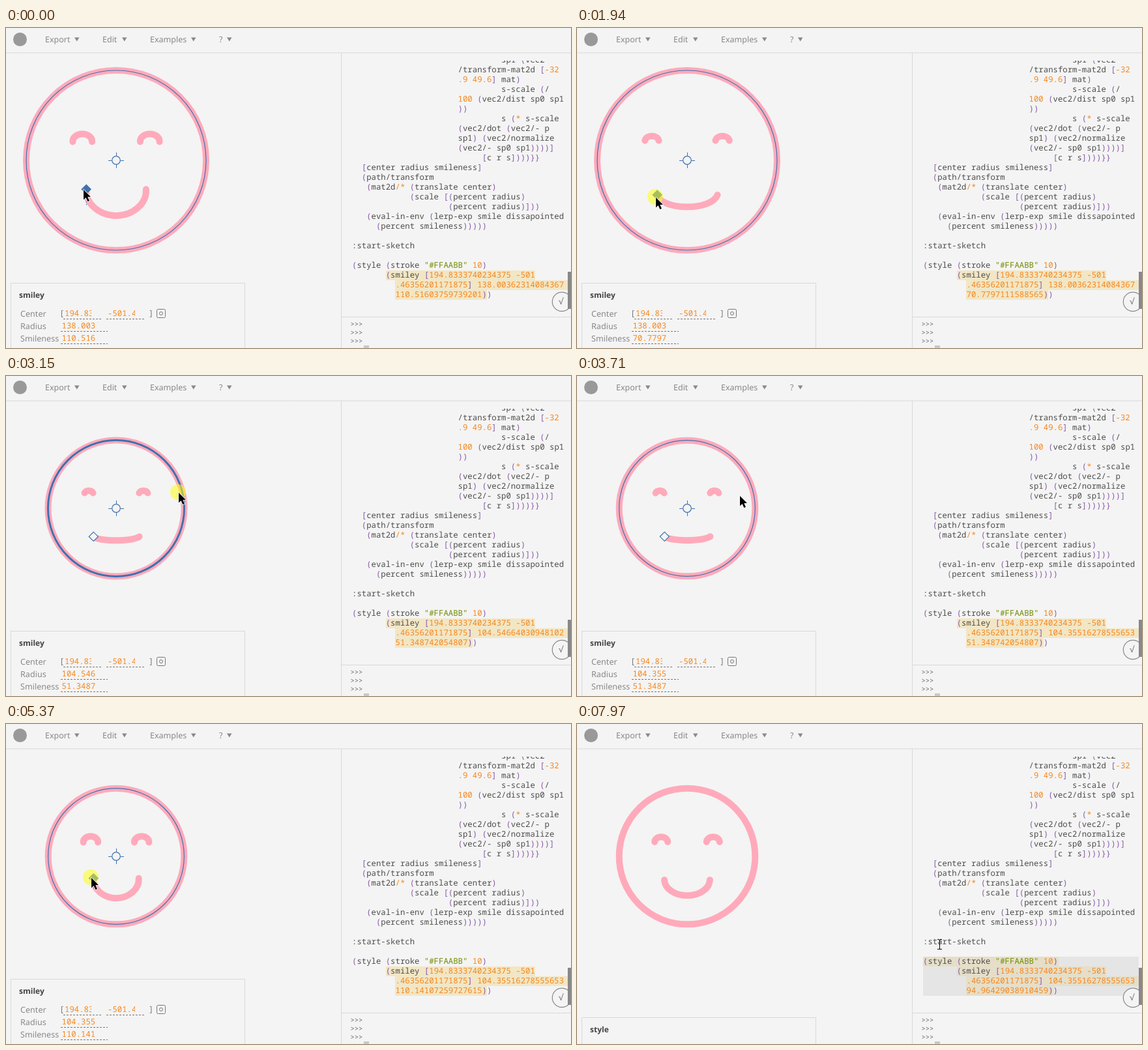
An HTML page with a canvas for the animation above (8 s loop, 867x491 px).

```html
<!DOCTYPE html>
<html lang="en">
<head>
<meta charset="utf-8">
<title>Smiley editor</title>
<style>
html, body { margin: 0; width: 100%; height: 100%; overflow: hidden; background: #f4f4f4; }
canvas { display: block; }
</style>
</head>
<body>
<canvas id="stage" width="867" height="491"></canvas>
<script>
const ctx = document.getElementById('stage').getContext('2d');
const LOOP = 8000, STEP = 92.4, LEAD = 85;
const BG = '#f4f4f4', PINK = '#ffaabb', BLUE = '#3f72b0', TAN = '#f2e6c4';
const GREY = '#888', LINE = '#d8d8d8', INK = '#4d4d4c';
const PURPLE = '#8959a8', ORANGE = '#f5871f', GREEN = '#718c00';
const CX = 169, CY = 203, COL = 7.39, CODE_X = 531;
const mono = size => size + 'px "Noto Sans Mono", "DejaVu Sans Mono", monospace';
const sans = (size, weight = '') => weight + ' ' + size + 'px "Noto Sans", "Open Sans", sans-serif';

// Keys: [step, value...]
const SMILE = [
  [0, 110.51603759739201], [5, 41.2], [9, 0.9137], [12, 32.08078443652971], [17, 112.3],
  [20, 70.7797111588565], [24, 44.1], [26, 51.348742054807], [51, 51.348742054807],
  [55, 115.2], [56, 115.2], [60, 94.96429038910459]
];
const RADIUS = [[30, 138.00362314084367], [33, 104.54664030948102], [36, 104.35516278555653]];
const POINTER = [
  [0, 118.5, 248], [9, 120, 269], [12, 120, 263], [17, 120, 248], [20, 121, 260], [26, 121, 262],
  [29, 299, 166], [30, 299, 166], [33, 265, 179], [36, 264, 180], [44, 226, 190], [45, 222, 192],
  [49, 131, 243], [51, 131, 243], [55, 131, 235], [56, 131, 235], [60, 131, 240], [61, 131, 240],
  [66, 664, 366], [69, 664, 366], [73, 534, 366], [76, 534, 366], [79, 494, 365], [85, 556, 338]
];
const PRESSES = [[0, 25], [30, 35], [52, 60], [66, 68], [74, 75]];

const CODE = [
  [31, 'sp1 (vec2'], [22, '/transform-mat2d [-32'], [22, '.9 49.6] mat)'],
  [31, 's-scale (/'], [22, '100 (vec2/dist sp0 sp1'], [22, '))'], [31, 's (* s-scale'],
  [22, '(vec2/dot (vec2/- p'], [22, 'sp1) (vec2/normalize'], [22, '(vec2/- sp0 sp1))))]'],
  [27, '[c r s])))}}'], [2, '[center radius smileness]'], [2, '(path/transform'],
  [3, '(mat2d/* (translate center)'], [12, '(scale [(percent radius)'],
  [20, '(percent radius)]))'], [3, '(eval-in-env (lerp-exp smile dissapointed'],
  [5, '(percent smileness)))))'], [0, ''], [0, ':start-sketch'], [0, ''],
  [0, '(style (stroke "#FFAABB" 10)'], [7, '(smiley [194.8333740234375 -501']
];
const TOKEN = /("[^"]*")|([()\[\]{}]+)|((?<![\w-])-?\d*\.?\d+\b|\/?\*)|[^\s()\[\]{}"*]+?(?=[\s()\[\]{}"*]|\/\*|$)/g;

function at(keys, q, i = 1) {
  if (q <= keys[0][0]) return keys[0][i];
  for (let k = 1; k < keys.length; k++) {
    const a = keys[k - 1], b = keys[k];
    if (q < b[0]) return a[i] + (b[i] - a[i]) * (q - a[0]) / (b[0] - a[0]);
  }
  return keys[keys.length - 1][i];
}

function rect(x, y, w, h, color) {
  ctx.fillStyle = color;
  ctx.fillRect(x, y, w, h);
}

function text(str, x, y, color, font) {
  ctx.font = font;
  ctx.fillStyle = color;
  ctx.fillText(str, x, y);
}

function stroke(color, width) {
  ctx.strokeStyle = color;
  ctx.lineWidth = width;
  ctx.stroke();
}

function circle(x, y, r) {
  ctx.beginPath();
  ctx.arc(x, y, r, 0, Math.PI * 2);
}

function line(x1, y1, x2, y2, color, dash = []) {
  ctx.setLineDash(dash);
  ctx.beginPath();
  ctx.moveTo(x1, y1);
  ctx.lineTo(x2, y2);
  stroke(color, 1);
  ctx.setLineDash([]);
}

function clipped(x, y, w, h, draw) {
  ctx.save();
  ctx.beginPath();
  ctx.rect(x, y, w, h);
  ctx.clip();
  draw();
  ctx.restore();
}

// Bow between two ends at height y, with its middle at height top
function bow(x, w, y, top, slant) {
  const bend = y + (top - y) * 0.55, out = w * (1 - slant), mid = w * 0.55;
  ctx.beginPath();
  ctx.moveTo(x - w, y);
  ctx.bezierCurveTo(x - out, bend, x - mid, top, x, top);
  ctx.bezierCurveTo(x + mid, top, x + out, bend, x + w, y);
  stroke(PINK, 10);
}

function drawFace(s, r) {
  const slant = 0.3 * (1 - s / 100);
  ctx.lineCap = 'round';
  circle(CX, CY, r);
  stroke(PINK, 10);
  bow(CX, r * (0.347 - 0.00013 * s), CY + r * (0.496 - 0.00157 * s), CY + r * (0.345 + 0.00245 * s), slant);
  const outer = 0.447 + 0.00032 * s, inner = 0.4 - 0.0012 * s;
  for (const side of [-1, 1]) {
    bow(CX + side * r * (outer + inner) / 2, r * (outer - inner) / 2,
      CY - r * (0.242 - 0.00032 * s), CY - r * (0.2265 + 0.00061 * s), slant);
  }
  ctx.lineCap = 'butt';
}

function drawHandles(q, s, r) {
  const rim = q >= 29 && q <= 36, active = q <= 27 || q >= 48;
  circle(CX, CY, r);
  stroke(BLUE, rim ? 3 : 1.2);
  circle(CX, CY, 6.3);
  ctx.fillStyle = BG;
  ctx.fill();
  stroke(BLUE, 1.2);
  for (const d of [-1, 1]) {
    line(CX + d * 6.5, CY + 0.5, CX + d * 12, CY + 0.5, BLUE);
    line(CX + 0.5, CY + d * 6.5, CX + 0.5, CY + d * 12, BLUE);
  }
  const x = CX - 0.332 * r, y = CY + (0.496 - 0.00157 * s) * r;
  if (active) line(Math.round(x) + 0.5, CY + 0.339 * r, Math.round(x) + 0.5, CY + 0.496 * r, BLUE, [2, 2]);
  ctx.beginPath();
  ctx.moveTo(x, y - 7);
  ctx.lineTo(x + 7, y);
  ctx.lineTo(x, y + 7);
  ctx.lineTo(x - 7, y);
  ctx.closePath();
  ctx.fillStyle = active ? BLUE : BG;
  ctx.fill();
  stroke(BLUE, 1.2);
}

function drawHeader() {
  circle(21.5, 17.5, 10.5);
  ctx.fillStyle = '#999';
  ctx.fill();
  for (const [name, x, arrow] of [['Export', 60, 105], ['Edit', 148, 178], ['Examples', 221, 284], ['?', 327, 339]]) {
    text(name, x, 22, GREY, sans(12.5));
    ctx.beginPath();
    ctx.moveTo(arrow, 14.5);
    ctx.lineTo(arrow + 7.5, 14.5);
    ctx.lineTo(arrow + 3.75, 20.5);
    ctx.fill();
  }
  line(0, 38, 867, 38, LINE);
  line(514.5, 38, 514.5, 491, LINE);
  line(515, 443.5, 867, 443.5, LINE);
}

function field(value, x, y, from, to, clip, color = ORANGE, size = 12.3, rule = '#777') {
  clipped(x, y - 14, clip - x, 20, () => text(value, x, y, color, mono(size)));
  line(from, y + 4.5, to, y + 4.5, rule, [3, 2]);
}

function panel(top, title) {
  rect(7, top, 360, 491 - top, BG);
  ctx.strokeStyle = LINE;
  ctx.lineWidth = 1;
  ctx.strokeRect(7.5, top + 0.5, 359, 491);
  text(title, 20, top + 23, '#444', sans(12, 'bold'));
}

const label = (str, y, color = GREY) => text(str, 22, y, color, sans(12.6));

function smileyPanel(s, r) {
  panel(391, 'smiley');
  label('Center', 443);
  label('Radius', 462);
  label('Smileness', 481);
  text('[', 82, 442, '#777', mono(12.3));
  field('194.8333', 90, 442, 88, 148, 131);
  field('-501.463', 156, 442, 154, 214, 198);
  text(']', 219, 442, '#777', mono(12.3));
  ctx.beginPath();
  ctx.roundRect(231.5, 431.5, 13, 13, 2);
  stroke('#777', 1);
  circle(238, 438, 2.5);
  stroke('#777', 1);
  field(String(r), 85.5, 461, 84, 156, 137.5);
  field(String(s), 85.5, 480, 84, 156, 137.5);
}

function strokePanel() {
  panel(347, 'stroke');
  line(63, 366.5, 81, 366.5, GREY);
  ctx.beginPath();
  ctx.moveTo(77, 363);
  ctx.lineTo(81.5, 366.5);
  ctx.lineTo(77, 370);
  stroke(GREY, 1);
  text('alias for graphics/stroke', 86, 370, GREY, sans(12));
  text('Creates a stroke property', 20, 395, INK, sans(12.6));
  label('Color', 424);
  label('Width', 443);
  label('Cap', 462, '#bbb');
  label('Join', 481, '#bbb');
  field('#FFAABB', 85.5, 423, 84, 180, 180, GREEN, 11);
  field('10', 124.5, 442, 84, 156, 156);
  field('round', 85.5, 461, 84, 156, 156, '#b8c580', 11, '#bbb');
  field('round', 85.5, 480, 84, 156, 156, '#b8c580', 11, '#bbb');
  circle(197.5, 420, 7.3);
  ctx.fillStyle = PINK;
  ctx.fill();
  stroke(GREY, 1);
}

function codeLine(col, str, y) {
  for (const m of str.matchAll(TOKEN)) {
    const color = m[1] ? GREEN : m[2] ? PURPLE : m[3] ? ORANGE : INK;
    text(m[0], CODE_X + (col + m.index) * COL, y, color, mono(12.32));
  }
}

function drawCode(form, s, r) {
  const end = 597.5 + (String(s).length + 1) * COL;
  const bands = color => {
    rect(583, 372, 229, 15, color);
    rect(597, 387, 265, 15, color);
    rect(597, 402, end - 597, 15, color);
  };
  if (form === 'smiley') bands(TAN);
  if (form === 'stroke') rect(583, 357, 156, 15, TAN);
  if (form === 'style') {
    rect(531, 357, 331, 60, '#e5e5e5');
    rect(531, 357, 208, 15, '#e6dec8');
    bands('#e6dec8');
  }
  const lines = [...CODE, [9, '.46356201171875] ' + r], [9, s + '))']];
  clipped(515, 50, 352, 390, () => lines.forEach(([col, str], i) => codeLine(col, str, 53 + i * 15)));

  circle(853, 420, 14.7);
  ctx.fillStyle = BG;
  ctx.fill();
  stroke(GREY, 1.2);
  text('√', 848, 424, '#666', sans(13));
  rect(862, 374, 5, 57, '#888');
  for (let i = 0; i < 4; i++) text('>>>', 528.5, 458 + i * 13, '#666', mono(10.5));
  rect(549, 487, 8, 4, '#c8c8c8');
}

function arrow(x, y) {
  ctx.save();
  ctx.translate(x, y);
  ctx.beginPath();
  ctx.moveTo(0, 0);
  for (const [px, py] of [[0, 15.5], [3.6, 12.2], [6.4, 18.3], [9, 17.1], [6.3, 11.2], [11, 11]]) ctx.lineTo(px, py);
  ctx.closePath();
  ctx.lineJoin = 'round';
  stroke('#fff', 1.6);
  ctx.fillStyle = '#000';
  ctx.fill();
  ctx.restore();
}

function beam(x, y) {
  rect(x, y - 7, 1, 15, '#000');
  for (const edge of [y - 8, y + 7]) {
    rect(x - 3, edge, 3, 1, '#000');
    rect(x + 1, edge, 3, 1, '#000');
  }
}

function drawPointer(q) {
  const x = Math.round(at(POINTER, q, 1)), y = Math.round(at(POINTER, q, 2));
  if (PRESSES.some(([a, b]) => q >= a && q <= b)) {
    circle(x - 1, y - 1, 12);
    ctx.fillStyle = 'rgba(255,255,20,0.55)';
    ctx.fill();
  }
  if (x > 515 && y > 50) beam(x, y);
  else arrow(x, y);
}

function draw(ms) {
  const q = Math.floor((ms - LEAD) / STEP);
  const s = at(SMILE, q), r = at(RADIUS, q);
  const form = q < 66 ? 'smiley' : q < 74 ? 'stroke' : 'style';
  ctx.textRendering = 'geometricPrecision';
  rect(0, 0, 867, 491, BG);
  drawFace(s, r);
  if (form === 'smiley') {
    drawHandles(q, s, r);
    smileyPanel(s, r);
  } else if (form === 'stroke') strokePanel();
  else panel(450, 'style');
  drawHeader();
  drawCode(form, s, r);
  drawPointer(q);
}

const start = performance.now();
function tick() {
  draw((performance.now() - start) % LOOP);
  requestAnimationFrame(tick);
}
tick();
</script>
</body>
</html>
```
